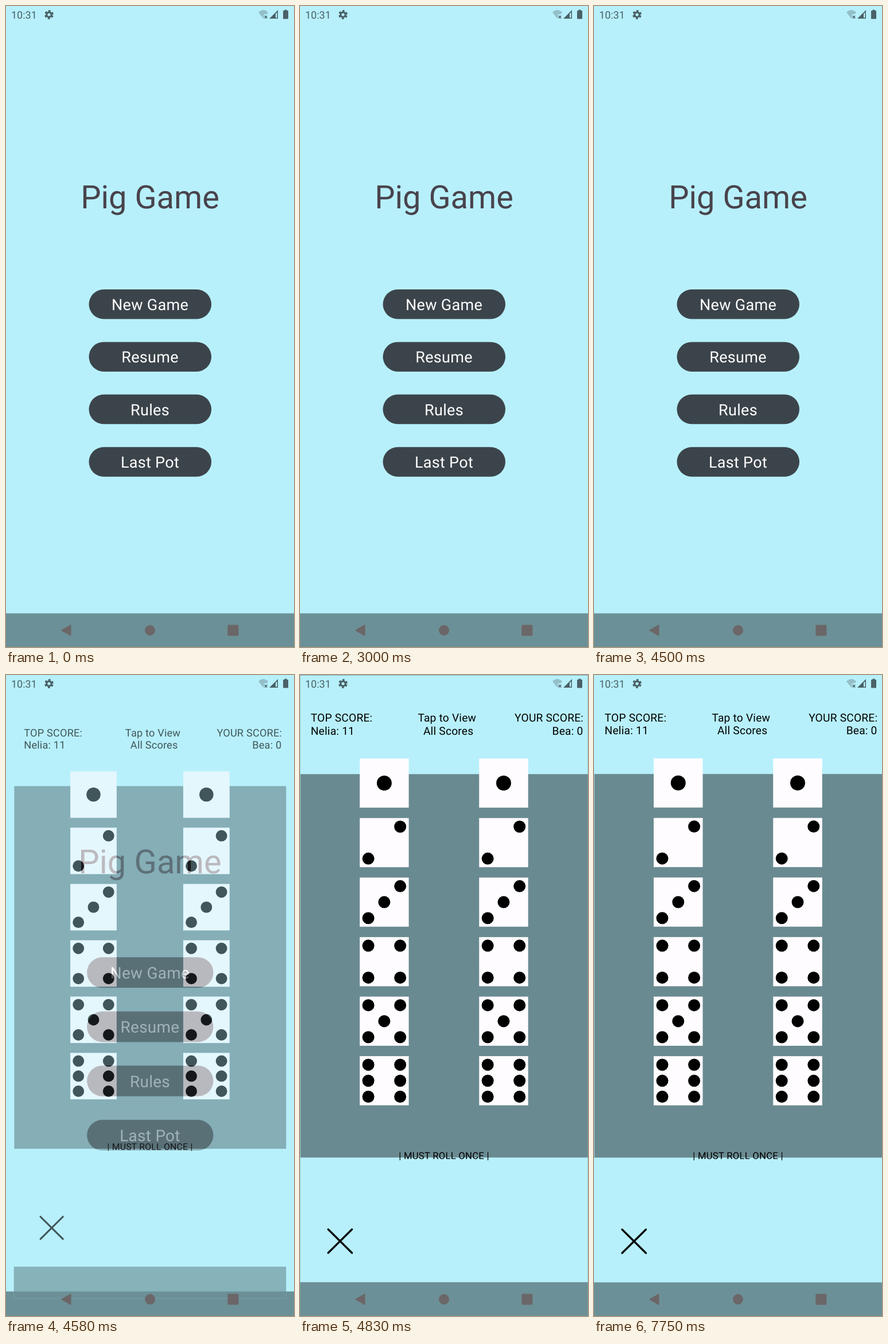
These frames come from a looping animation (502 px wide and 1115 px high, 7.83 s). An HTML page:

```html
<!DOCTYPE html>
<html lang="en">
<head>
<meta charset="utf-8">
<title>Pig Game</title>
<style>
  html, body { margin: 0; width: 100%; height: 100%; overflow: hidden; background: #b7f0fb; }
  svg { display: block; width: 100%; height: 100%; }
  text { font-family: Roboto, sans-serif; text-rendering: geometricPrecision; }
  .title { font-size: 56px; fill: #49434c; text-anchor: middle; }
  .label { font-size: 27px; letter-spacing: .3px; fill: #fff; text-anchor: middle; }
  .score { font-size: 19.2px; letter-spacing: .2px; }
  .note { font-size: 16.7px; letter-spacing: .25px; }
  .mid { text-anchor: middle; }
  .end { text-anchor: end; }
  .bar { fill: #6c9097; }
</style>
</head>
<body>
<svg viewBox="0 0 502 1115" preserveAspectRatio="none">
  <g id="menu">
    <rect width="502" height="1115" fill="#b7f0fb"/>
    <text class="title" x="251" y="351.5">Pig Game</text>
    <g id="buttons"></g>
    <rect class="bar" y="1056.5" width="502" height="58.5"/>
  </g>
  <rect id="dim" width="502" height="1115"/>

  <g id="game">
    <rect width="502" height="1115" fill="#b7f0fb"/>
    <rect x=".7" y="172.2" width="501.3" height="667.3" fill="#6a8a91"/>
    <text class="score" x="18.6" y="80.5">TOP SCORE:</text>
    <text class="score" x="18.6" y="103.3">Nelia: 11</text>
    <text class="score mid" x="256.3" y="80.5">Tap to View</text>
    <text class="score mid" x="258.6" y="103.3">All Scores</text>
    <text class="score end" x="494.3" y="80.5">YOUR SCORE:</text>
    <text class="score end" x="493.6" y="103.3">Bea: 0</text>
    <g id="dice"></g>
    <text class="note mid" x="251" y="842">| MUST ROLL ONCE |</text>
    <path d="M49 964.5L90.5 1005.5M90.5 964.5L49 1005.5" stroke="#000" stroke-width="3.3" stroke-linecap="round"/>
    <rect class="bar" y="1056.5" width="502" height="58.5"/>
  </g>

  <!-- system icons stay fixed above both screens -->
  <g fill="#4a6167">
    <text x="9" y="21.5" font-size="18">10:31</text>
    <g fill="none" stroke="#4a6167" transform="translate(75 15)">
      <circle r="4.2" stroke-width="3.2"/>
      <circle r="6.4" stroke-width="3" stroke-dasharray="3.6 3.1" transform="rotate(14)"/>
    </g>
    <path d="M448.5 22L440 11Q448.5 3 457 11L454.3 14.6H449.6V20.6Z" fill="#94bfc9"/>
    <path d="M450.8 17L455.2 21.4M455.2 17L450.8 21.4" stroke="#4a6167" stroke-width="1.5"/>
    <path fill-rule="evenodd" d="M459 22H474V7ZM470 13.5V20.5H472.5V11Z"/>
    <path d="M483 9Q483 8 484 8H485.5V6.5H489.5V8H491Q492 8 492 9V21.5Q492 22.5 491 22.5H484Q483 22.5 483 21.5Z"/>
  </g>
  <g fill="#6b6667">
    <path d="M96.5 1086L113 1076.5V1095.5Z" stroke="#6b6667" stroke-linejoin="round"/>
    <circle cx="251" cy="1086" r="9"/>
    <rect x="386.3" y="1076.5" width="19" height="19" rx="1.5"/>
  </g>
</svg>
<script>
const LOOP = 7830, START = 4500;
const STEPS = [4580, 4670, 4750, 4830, 4920];
const $ = id => document.getElementById(id);
const clamp = v => Math.min(1, Math.max(0, v));

$('buttons').innerHTML = ['New Game', 'Resume', 'Rules', 'Last Pot'].map((name, i) => {
  const y = 493 + i * 91.4;
  return `<rect x="144.5" y="${y}" width="213.5" height="51.5" rx="25.75" fill="#3c444b"/>` +
    `<text class="label" x="251" y="${y + 36}">${name}</text>`;
}).join('');

// pip positions on a 3 x 3 grid, from -1 to 1
function pips(n) {
  const list = n % 2 ? [[0, 0]] : [];
  if (n > 1) list.push([1, -1], [-1, 1]);
  if (n > 3) list.push([-1, -1], [1, 1]);
  if (n > 5) list.push([-1, 0], [1, 0]);
  return list;
}

function die(x, n) {
  const y = 187.8 + (n - 1) * 103.6;
  const dots = pips(n).map(([u, v]) =>
    `<circle cx="${x + u * 27.8}" cy="${y + v * 27.8}" r="${n === 1 ? 13 : 10.5}"/>`);
  return `<rect x="${x - 42.75}" y="${y - 42.75}" width="85.5" height="85.5" fill="#fefcff"/>` + dots.join('');
}

$('dice').innerHTML = [146.8, 355].map(x =>
  [1, 2, 3, 4, 5, 6].map(n => die(x, n)).join('')).join('');

const bezier = (a, b, c, d, u) => {
  const w = 1 - u;
  return w * w * w * a + 3 * w * w * u * b + 3 * w * u * u * c + u * u * u * d;
};

// two joined curves: quick start, very slow finish
function ease(x) {
  if (x <= 0) return 0;
  if (x >= 1) return 1;
  const [xs, ys] = x < 1 / 6
    ? [[0, .05, .133333, 1 / 6], [0, 0, .06, .4]]
    : [[1 / 6, .208333, .25, 1], [.4, .82, 1, 1]];
  let lo = 0, hi = 1;
  for (let i = 0; i < 30; i++) {
    const u = (lo + hi) / 2;
    if (bezier(...xs, u) < x) lo = u; else hi = u;
  }
  return bezier(...ys, lo);
}

function zoom(el, s) {
  el.setAttribute('transform', `translate(251 557.5) scale(${s}) translate(-251 -557.5)`);
}

function draw(now) {
  const t = now % LOOP;
  const held = STEPS.filter(s => s <= t).pop() || START;
  const age = held - START;
  const p = ease(age / 400);
  zoom($('menu'), 1 + .05 * p);
  zoom($('game'), .85 + .15 * p);
  $('game').setAttribute('opacity', clamp((age - 48) / 50));
  $('dim').setAttribute('opacity', clamp((age - 80) / 290));
}

let begin;
function tick(now) {
  begin ??= now;
  draw(now - begin);
  requestAnimationFrame(tick);
}
draw(0);
requestAnimationFrame(tick);
</script>
</body>
</html>
```
